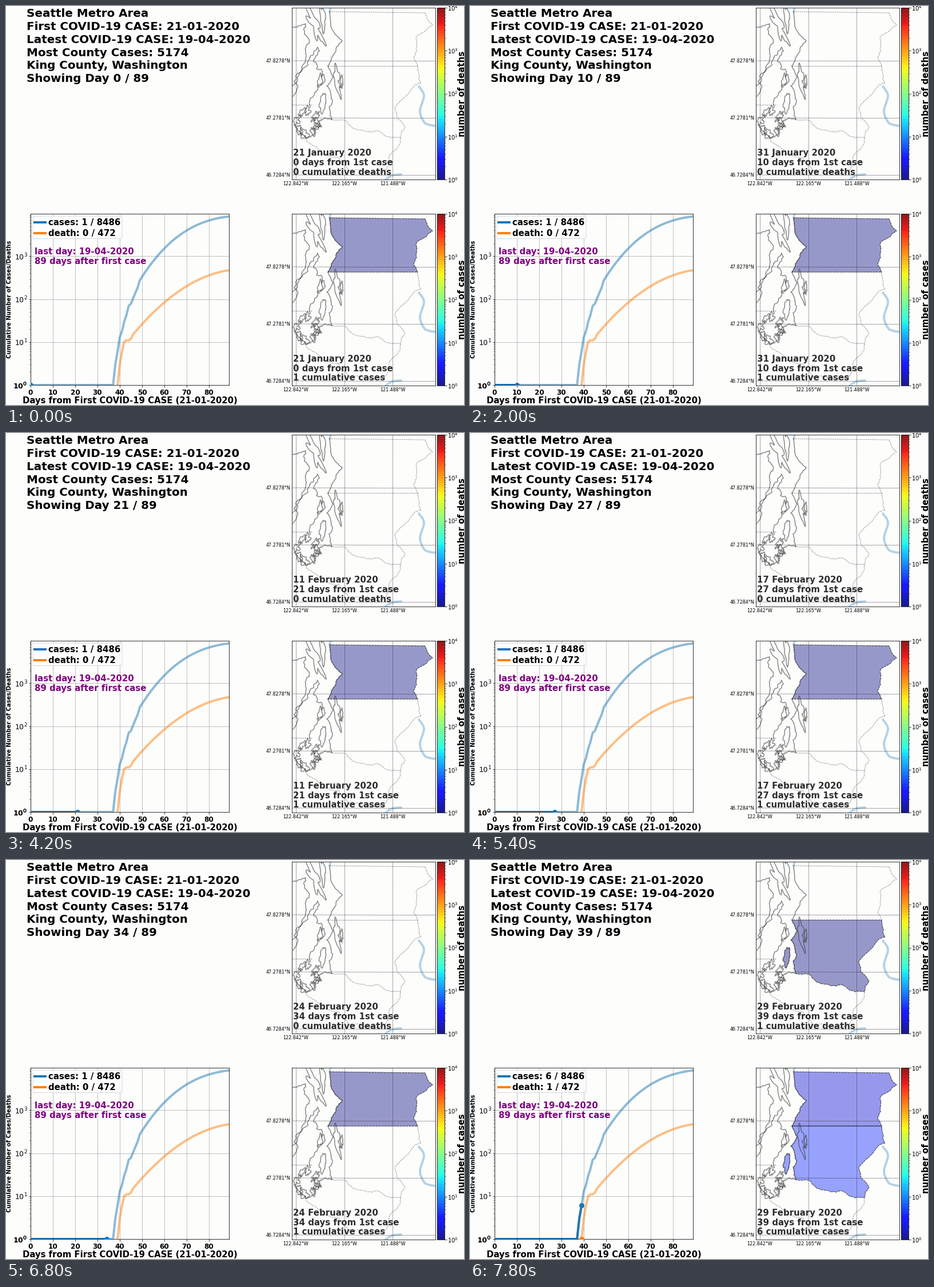
These frames come from a looping animation (801x699 px, 8000 ms). A matplotlib script:

```python
import numpy as np
import matplotlib.pyplot as plt
from matplotlib.animation import FuncAnimation
from matplotlib.patches import FancyBboxPatch, Polygon

W, H = 801, 699
DAYS = 40
BG = "#fdfefc"
BLUE, ORANGE = "#1f77b4", "#ff7f0e"
JET = plt.get_cmap("jet")

plt.rcParams.update({"font.family": "DejaVu Sans", "axes.linewidth": 0.8})
fig = plt.figure(figsize=(W / 72, H / 72), dpi=72, facecolor=BG)
rng = np.random.default_rng(11)


def px_axes(left, top, right, bottom, z=1):
    box = [left / W, 1 - bottom / H, (right - left) / W, (bottom - top) / H]
    return fig.add_axes(box, zorder=z, facecolor=BG)


stage = px_axes(0, 0, W, H, 3)
stage.set(xlim=(0, W), ylim=(H, 0))
stage.axis("off")


def label(x, y, s, size, ha="left", color="black", weight="bold", **kw):
    return stage.text(x, y, s, size=size, ha=ha, va="baseline", color=color,
                      weight=weight, **kw)


def upright(x, y, s, size):
    label(x, y, s, size, "center", rotation=90, rotation_mode="anchor")


def power(k, style="mathdefault"):
    return rf"$\{style}{{10^{{{k}}}}}$"


# ---- headline ----
HEAD = ["Seattle Metro Area", "First COVID-19 CASE: 21-01-2020",
        "Latest COVID-19 CASE: 19-04-2020", "Most County Cases: 5174",
        "King County, Washington", ""]
head = [label(35.8, 19.2 + 22.8 * k, s, 19.88) for k, s in enumerate(HEAD)]

# ---- chart: first counts one by one, then a smooth curve in log space ----
days = np.arange(90)


def growth(start, first, coef):
    """Missing before start, then the first counts, then 10 ** polynomial."""
    bend = start + len(first)
    t = (days - bend) / (89 - bend)
    out = 10 ** np.polynomial.polynomial.polyval(t, coef)
    out[:start] = np.nan
    out[start:bend] = first
    return out


cases = growth(37, [1, 3, 6, 13, 18, 30, 43, 70, 78, 105, 140, 185],
               [2.44, 3.322, -2.434, 0.601])
cases[:37] = 1
deaths = growth(39, [1, 3, 6, 10, 11, 11, 12], [1.18, 2.666, -1.172])

chart = px_axes(43, 364, 390, 664)
chart.set_yscale("log")
chart.set(xlim=(0, 89), ylim=(1, 8486 * 1.15))
chart.grid(color="#b0b0b0", lw=0.8)
chart.set_axisbelow(True)
tens = range(0, 90, 10)
chart.set_xticks(tens)
chart.set_xticklabels([str(d) for d in tens], weight="bold", size=12)
chart.set_yticks([1, 10, 100, 1000])
chart.set_yticklabels([power(0, "mathbf")] + [power(k) for k in (1, 2, 3)])
chart.tick_params(axis="y", labelsize=12.5, pad=2)
chart.tick_params(axis="y", which="minor", labelleft=False)

progress = []
for series, col in ((cases, BLUE), (deaths, ORANGE)):
    chart.plot(days, series, color=col, lw=4, alpha=0.5, zorder=2.5)
    line, = chart.plot([], [], color=col, lw=4, zorder=3)
    dot, = chart.plot([], [], "o", color=col, ms=9, mew=0, zorder=4)
    progress.append((series, line, dot))

label(216.5, 696.3, "Days from First COVID-19 CASE (21-01-2020)", 14.93, "center")
upright(9, 514, "Cumulative Number of Cases/Deaths", 10)
label(50, 435.5, "last day: 19-04-2020", 15, color="purple")
label(50, 452, "89 days after first case", 15, color="purple")

stage.add_patch(FancyBboxPatch((47, 368), 156, 39.5, fc="white", ec="#cccccc",
                               boxstyle="round,pad=0,rounding_size=3",
                               alpha=0.8, lw=1))
legend = []
for y, col in ((379, BLUE), (397.5, ORANGE)):
    stage.plot([50, 68.5], [y, y], color=col, lw=4)
    legend.append(label(74, y + 5.3, "", 15))


# ---- map outlines, in the pixels of the upper map ----
def rough(pts, k=0.07, levels=4):
    """Fractal midpoint displacement between a few key points."""
    p = np.array(pts, float)
    for _ in range(levels):
        step = np.diff(p, axis=0)
        side = step[:, ::-1] * [-1, 1]
        mid = p[:-1] + step / 2 + side * rng.normal(0, k, (len(step), 1))
        out = np.empty((2 * len(p) - 1, 2))
        out[::2], out[1::2] = p, mid
        p = out
    return p


def smooth(pts, n=10):
    """Catmull-Rom curve through the points."""
    p = np.array([pts[0], *pts, pts[-1]], float)
    t = np.linspace(0, 1, n)[:, None]
    return np.vstack([
        b + t * (c - a) / 2 + t**2 * (a - 2.5 * b + 2 * c - d / 2)
        + t**3 * (1.5 * (b - c) + (d - a) / 2)
        for a, b, c, d in zip(p, p[1:], p[2:], p[3:])])


def island(cx, cy, w, h, tilt=0.0, wobble=0.13):
    """Closed ragged outline: an ellipse with random harmonics."""
    a = np.linspace(0, 2 * np.pi, 70)
    r = 1 + sum(rng.normal(0, wobble) * np.sin(n * a + rng.uniform(0, 6.3))
                for n in range(2, 9))
    y = h * r * np.sin(a)
    return np.column_stack([cx + w * r * np.cos(a) + tilt * y, cy + y])


SNO_COAST = rough([(566, 10), (568, 34), (588, 61), (572, 86), (563, 105)])
SNO_EAST = rough([(733, 12), (737, 23), (746, 33), (718, 54), (718, 80),
                  (713, 93), (720, 105)])
KING_EAST = rough([(720, 105), (726, 135), (697, 160), (680, 178), (684, 196),
                   (698, 212), (690, 231)])
KING_SOUTH = rough([(690, 231), (674, 231), (650, 218), (630, 220), (605, 213),
                    (592, 200), (570, 199)])
KING_COAST = rough([(570, 199), (565, 177), (571, 165), (561, 140), (572, 125),
                    (563, 105)])
VASHON = island(554, 170, 5, 17, -0.1, 0.08)
SNOHOMISH = np.vstack([SNO_COAST[::-1], SNO_EAST])
KING = np.vstack([KING_EAST, KING_SOUTH, KING_COAST])

BORDERS = [
    SNO_EAST, KING_EAST, KING_SOUTH,
    [(566, 10), (733, 12)], [(563, 105), (720, 105)], [(500, 173), (536, 173)],
    rough([(690, 231), (686, 246), (671, 261), (660, 291)]),
    rough([(523, 231), (555, 260), (600, 288), (660, 291)]),
]
COAST = [
    SNO_COAST, KING_COAST, VASHON,
    rough([(500, 37), (524, 31), (530, 66), (517, 108), (500, 141)], 0.14),
    rough([(502, 158), (530, 94), (545, 72), (553, 119), (532, 178)], 0.14),
    rough([(570, 199), (546, 203), (524, 232), (506, 208)], 0.16),
    island(540, 33, 7, 30, 0.4), island(554, 22, 4, 22, 0.1),
    island(551, 130, 5, 11), island(579, 131, 5, 22, 0.2), island(587, 132, 2, 10),
]
for turn in np.arange(9) * 2.4:
    COAST.append(island(526 + 18 * np.cos(turn), 204 + 20 * np.sin(turn),
                        rng.uniform(3, 6), rng.uniform(5, 10),
                        rng.uniform(-0.6, 0.6)))

RIVERS = [
    smooth([(722, 141), (731, 157), (724, 184), (731, 203), (740, 208), (752, 210)]),
    smooth([(664, 304), (675, 297), (691, 295)]),
    smooth([(568, 2), (566, 10)]),
]


def dashed(ax, pts, color, dash):
    ax.plot(*np.array(pts, float).T, color=color, lw=0.8, ls=(0, dash), zorder=4)


def build_map(dy, kind):
    ax = px_axes(500, 3 + dy, 751, 304 + dy)
    ax.set(xlim=(500, 751), ylim=(304, 3), xticks=[], yticks=[])
    for r in RIVERS:
        ax.plot(*r.T, color="#b5d2e7", lw=4, zorder=1, solid_capstyle="round")
    fills = {}
    for name, shapes in (("sno", [SNOHOMISH]), ("king", [KING, VASHON])):
        fills[name] = [ax.add_patch(Polygon(s, lw=1, ls="--", zorder=2,
                                            visible=False)) for s in shapes]
    for c in COAST:
        ax.plot(*c.T, color=(0.25, 0.25, 0.25, 0.62), lw=1.5, zorder=3)
    for b in BORDERS:
        dashed(ax, b, (0.2, 0.2, 0.2, 0.65), (3, 1.5))
    for x, s in ((506.5, "122.842"), (591.5, "122.165"), (676, "121.488")):
        dashed(ax, [(x, 3), (x, 304)], "#222222", (1, 1))
        label(x, 314 + dy, s + "°W", 8, "center", weight="normal")
    for y, s in ((96, "47.8278"), (196, "47.2781"), (296, "46.7284")):
        dashed(ax, [(500, y), (751, y + 0.6)], "#222222", (1, 1))
        label(497.5, y + 3 + dy, s + "°N", 8, "right", weight="normal")
    notes = [label(502.3, 262.4 + 16.55 * k + dy, "", 15, color="#2d2d2d")
             for k in range(3)]

    bar = px_axes(754, 3 + dy, 767, 304 + dy)
    bar.imshow(np.linspace(0, 1, 256)[:, None], cmap=JET, aspect="auto",
               origin="lower", extent=(0, 1, 0, 4), alpha=0.9)
    bar.set_xticks([])
    bar.yaxis.tick_right()
    bar.set_yticks(range(5))
    bar.set_yticklabels([power(k) for k in range(5)], size=10)
    bar.set_yticks([k + np.log10(m) for k in range(4) for m in range(2, 10)],
                   minor=True)
    bar.tick_params(axis="y", pad=2)
    upright(801.5, 153.5 + dy, "number of " + kind, 15)
    return fills, notes


death_map = build_map(0, "deaths")
case_map = build_map(361, "cases")


def show(parts, day, date, total, kind, counts):
    fills, notes = parts
    lines = (date, f"{day} days from 1st case", f"{total} cumulative {kind}")
    for note, s in zip(notes, lines):
        note.set_text(s)
    for name, n in counts.items():
        for patch in fills[name]:
            patch.set_visible(n > 0)
            if n:
                patch.set_facecolor(JET(np.log10(n) / 4)[:3] + (0.4,))
                patch.set_edgecolor((0, 0, 0, 0.6))


def update(day):
    date = f"{21 + day} January 2020" if day <= 10 else f"{day - 10:02d} February 2020"
    total = int(round(cases[day]))
    dead = int(np.nan_to_num(deaths[day]))
    sno = 1 if day < 38 else 2
    head[-1].set_text(f"Showing Day {day} / 89")
    legend[0].set_text(f"cases: {total} / 8486")
    legend[1].set_text(f"death: {dead} / 472")
    for series, line, dot in progress:
        line.set_data(days[:day + 1], series[:day + 1])
        dot.set_data([day], [series[day]])
    show(death_map, day, date, dead, "deaths", {"sno": 0, "king": dead})
    show(case_map, day, date, total, "cases", {"sno": sno, "king": total - sno})
    return []


anim = FuncAnimation(fig, update, frames=DAYS, interval=200, repeat=True,
                     repeat_delay=0, init_func=lambda: update(0), blit=False)
plt.show()
```
